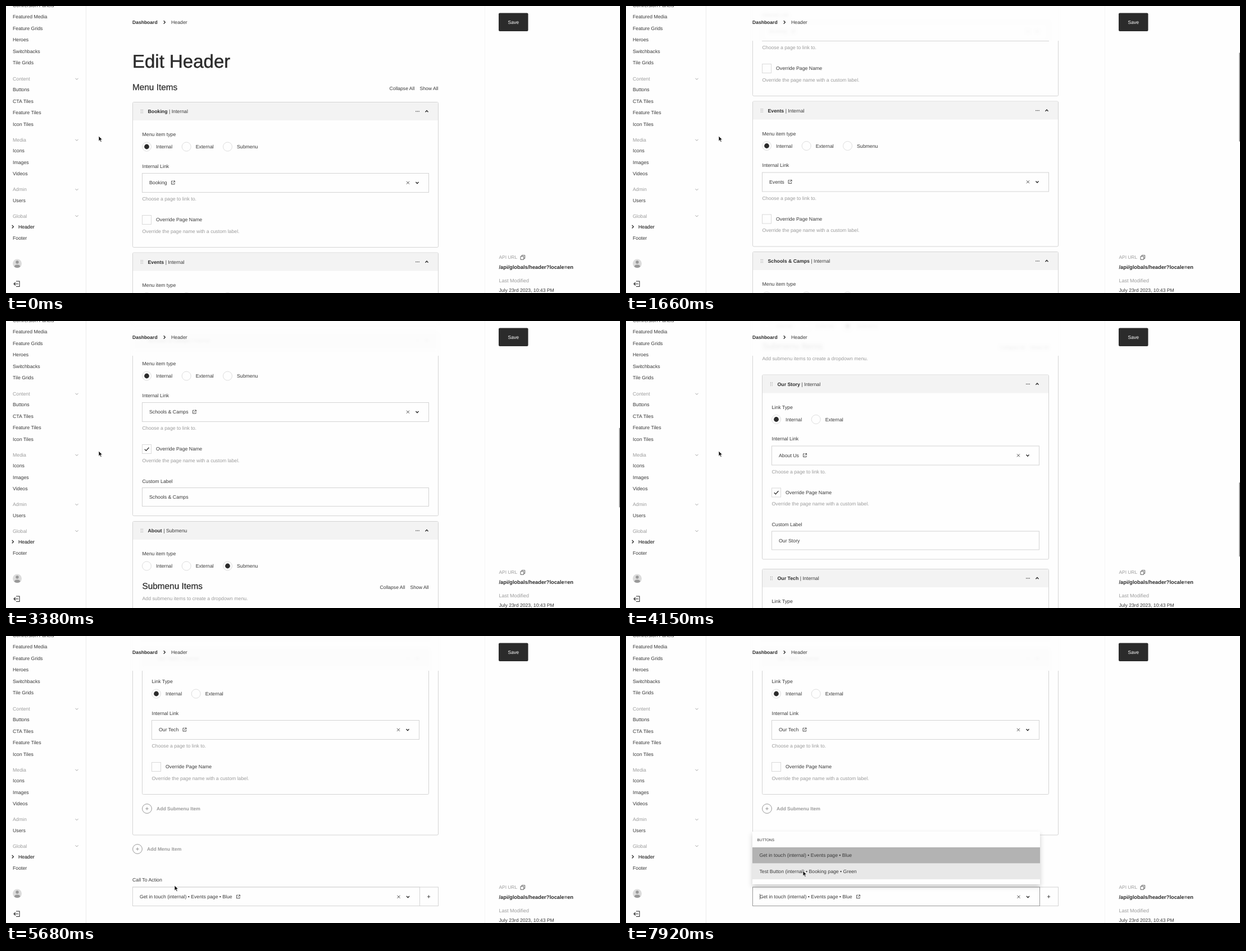
An HTML page that plays this animation: 1093x512 px, repeating every 8000 ms.

```html
<!DOCTYPE html>
<html lang="en">
<head>
<meta charset="utf-8">
<title>Edit Header</title>
<style>
  html, body { margin: 0; width: 100%; height: 100%; overflow: hidden; background: #fefefe; }
  svg { display: block; width: 1093px; height: 512px; }
  text { font-family: "Liberation Sans", Arial, sans-serif; text-rendering: geometricPrecision; white-space: pre; }
</style>
</head>
<body>
<svg id="stage" viewBox="0 0 1093 512"></svg>
<script>
const INK = '#383838', DARK = '#2b2b2b', MUTED = '#9b9b9b', LINE = '#d4d4d4';
const LOOP = 8000, MAX_SCROLL = 1537;

// Drawing helpers; y is the middle of the capitals.
const text = (x, y, str, { size = 8.75, fill = INK, bold = false, extra = '' } = {}) =>
  `<text x="${x}" y="${y + size * 0.355}" font-size="${size}" fill="${fill}"${bold ? ' font-weight="700"' : ''} ${extra}>${str}</text>`;
const hint = (x, y, str) => text(x, y, str, { fill: MUTED, size: 8.72 });
const box = (x, y, r, b, fill = '#fefefe', stroke = LINE, extra = '') =>
  `<rect x="${x}" y="${y}" width="${r - x}" height="${b - y}" fill="${fill}" stroke="${stroke}" ${extra}/>`;
const path = (d, stroke = DARK, width = 1, extra = '') =>
  `<path d="${d}" fill="none" stroke="${stroke}" stroke-width="${width}" ${extra}/>`;
const dot = (x, y, r, fill = DARK) => `<circle cx="${x}" cy="${y}" r="${r}" fill="${fill}"/>`;
const chevron = (x, y, dir = 1, color = DARK, width = 1.4) =>
  path(`M${x - 2.5} ${y - 1.2 * dir}L${x} ${y + 1.4 * dir}L${x + 2.5} ${y - 1.2 * dir}`, color, width);
const chevronRight = (x, y) => path(`M${x - 1.3} ${y - 2.8}l2.7 2.8l-2.7 2.8`, DARK, 1.3);
const cross = (x, y) => path(`M${x - 2.5} ${y - 2.5}l5 5m0 -5l-5 5`, INK, 0.9);
const plus = (x, y, color) => path(`M${x - 2.7} ${y}h5.4m-2.7 -2.7v5.4`, color, 0.9);
const linkIcon = (x, y) =>
  path(`M${x - 0.5} ${y - 2.7}h-2.5v5.7h5.6v-2.3M${x - 1} ${y + 1}l4 -4m-2.6 0h2.6v2.6`, INK, 0.85);
const heading = (x, y, str) =>
  text(x, y, str, { size: 15.35, fill: DARK, extra: `stroke="${DARK}" stroke-width=".25"` });
const toggles = (right, y) =>
  text(right - 87.5, y, 'Collapse All', { size: 8.6 }) + text(right - 33.5, y, 'Show All', { size: 8.6 });

function radios(x, y, names, chosen) {
  const offsets = [0, 70.7, 144];
  return names.map((name, i) => {
    const cx = x + offsets[i];
    return `<circle cx="${cx}" cy="${y}" r="8" fill="#fefefe" stroke="#dedede"/>` +
      (i === chosen ? dot(cx, y, 4.4) : '') + text(cx + 16.5, y, name);
  }).join('');
}

function blockFrame(x, y, right, bottom, title, kind) {
  let out = box(x + 0.5, y + 0.5, right - 0.5, bottom - 0.5, '#fefefe', LINE, 'rx="2"');
  out += `<rect x="${x + 1}" y="${y + 1}" width="${right - x - 2}" height="32" fill="#f3f3f3"/>`;
  const my = y + 17;
  for (let i = 0; i < 6; i++) out += dot(x + 15.5 + (i % 2) * 2.7, my - 2.6 + (i >> 1) * 2.6, 0.6, '#888');
  out += text(x + 27.5, my, `<tspan font-weight="700" fill="${DARK}">${title}</tspan> | ${kind}`);
  for (let i = -1; i < 2; i++) out += dot(right - 37.5 + i * 2.6, my, 0.75);
  return out + chevron(right - 21, my, -1);
}

// A link entry; a custom label makes it 70 px taller.
function linkBlock(x, y, right, { title, label, types, page, icon, custom }) {
  const left = x + 17.5, edge = right - 17.5;
  let out = blockFrame(x, y, right, y + (custom ? 330 : 260), title, 'Internal');
  out += text(left, y + 58, label) + radios(x + 25.5, y + 80, types, 0);
  out += text(left, y + 114.5, 'Internal Link');
  out += box(left, y + 127.5, edge, y + 161.5);
  out += text(x + 30, y + 144, page) + linkIcon(icon, y + 144);
  out += cross(right - 54.5, y + 144.3) + chevron(right - 38, y + 144.3);
  out += hint(left, y + 173, 'Choose a page to link to.');
  out += box(left, y + 202.5, left + 16, y + 218.5, '#fefefe', '#dadada');
  if (custom) out += path(`M${x + 21.8} ${y + 210.7}l2.6 2.7l5 -5.6`, DARK, 1.3);
  out += text(x + 42, y + 210, 'Override Page Name');
  out += hint(left, y + 230.5, 'Override the page name with a custom label.');
  if (custom) {
    out += text(left, y + 267.5, 'Custom Label');
    out += box(left, y + 279.5, edge, y + 312.5) + text(x + 30, y + 296, custom);
  }
  return out;
}

const addButton = (x, y, str) =>
  `<circle cx="${x}" cy="${y}" r="8.4" fill="none" stroke="#999"/>` + plus(x, y, '#888') +
  text(x + 17, y, str, { size: 8.55, bold: true, fill: MUTED });

function documentBody() {
  const menu = { label: 'Menu item type', types: ['Internal', 'External', 'Submenu'] };
  const sub = { label: 'Link Type', types: ['Internal', 'External'] };
  return text(225, 98, 'Edit Header', { size: 33, fill: DARK, extra: `stroke="${DARK}" stroke-width=".5"` }) +
    heading(225, 145, 'Menu Items') + toggles(770, 146.5) +
    linkBlock(225, 171, 770, { ...menu, title: 'Booking', page: 'Booking', icon: 297.5 }) +
    linkBlock(225, 439.5, 770, { ...menu, title: 'Events', page: 'Events', icon: 292 }) +
    linkBlock(225, 708, 770, { ...menu, title: 'Schools &amp; Camps', page: 'Schools &amp; Camps', icon: 335.5, custom: 'Schools &amp; Camps' }) +
    blockFrame(225, 1047, 770, 1892.5, 'About', 'Submenu') +
    text(242.5, 1105, menu.label) + radios(250.5, 1127, menu.types, 2) +
    heading(242.5, 1163, 'Submenu Items') + toggles(753, 1164.5) +
    hint(242.5, 1184.5, 'Add submenu items to create a dropdown menu.') +
    linkBlock(242, 1213.5, 753, { ...sub, title: 'Our Story', page: 'About Us', icon: 318.5, custom: 'Our Story' }) +
    linkBlock(242, 1560, 753, { ...sub, title: 'Our Tech', page: 'Our Tech', icon: 318 }) +
    addButton(251, 1845, 'Add Submenu Item') + addButton(234, 1917, 'Add Menu Item') +
    text(225, 1972, 'Call To Action') +
    box(225.5, 1985, 769.5, 2018.5) + plus(752.5, 2002, INK) +
    box(225.5, 1985, 736.5, 2018.5, '#fefefe', LINE, 'id="field"') +
    text(238, 2002, 'Get in touch (internal) • Events page • Blue', { size: 8.69 }) +
    linkIcon(413.5, 2002) + cross(699, 2002.3) + chevron(715.5, 2002.3) +
    path('M238.5 1997v10', '#555', 0.8, 'id="caret"');
}

function sidebar() {
  const groups = [
    ['', -20.5, ['Conversion Panels', 'Featured Media', 'Feature Grids', 'Heroes', 'Switchbacks', 'Tile Grids']],
    ['Content', 130, ['Buttons', 'CTA Tiles', 'Feature Tiles', 'Icon Tiles']],
    ['Media', 239, ['Icons', 'Images', 'Videos']],
    ['Admin', 327.3, ['Users']],
    ['Global', 374.5, ['Header', 'Footer']]
  ];
  let out = '';
  for (const [name, y, rows] of groups) {
    if (name) out += text(12, y, name, { fill: MUTED }) + chevron(126, y, 1, MUTED, 0.9);
    rows.forEach((row, i) => {
      const active = row === 'Header';
      out += text(active ? 22 : 12, y + 19.3 + i * 20.5, row,
        active ? { extra: `stroke="${INK}" stroke-width=".2"` } : {});
    });
  }
  return out + chevronRight(12, 393.7) +
    dot(20, 459.5, 8, '#dcdcdc') + dot(20, 457, 2.7, '#999') +
    '<path d="M14.5 464.8a5.7 4.6 0 0 1 11 0a8 8 0 0 1 -11 0z" fill="#999"/>' +
    path('M18 491h6v9.5h-6M22 495.7h-8m2.8 -2.8l-2.8 2.8l2.8 2.8', DARK, 1.1);
}

const aside = () =>
  '<rect x="877" y="12.5" width="52.5" height="32.5" rx="2" fill="#2b2b2b"/>' +
  text(903.3, 29, 'Save', { size: 8.6, fill: '#fff', extra: 'text-anchor="middle"' }) +
  text(877.5, 448.5, 'API URL', { size: 8.4, fill: MUTED }) +
  path('M918 446.5v-1.8h5.7v5.7h-1.9M916 446.7h5.7v5.7h-5.7z', '#555', 0.9) +
  text(877.5, 465.5, '/api/globals/header?locale=en', { size: 9.3, bold: true, fill: DARK }) +
  text(877.5, 490, 'Last Modified', { size: 9, fill: MUTED }) +
  text(877.5, 506.5, 'July 23rd 2023, 10:43 PM', { size: 8.65 });

const stage = document.getElementById('stage');
stage.innerHTML = `
  <defs>
    <clipPath id="below"><rect id="belowRect" x="143" y="62" width="709" height="470"/></clipPath>
    <clipPath id="above"><rect id="aboveRect" x="143" y="0" width="709" height="62"/></clipPath>
    <filter id="soft" filterUnits="userSpaceOnUse" x="143" y="-10" width="709" height="90"><feGaussianBlur stdDeviation="2.5"/></filter>
    <filter id="lift" filterUnits="userSpaceOnUse" x="200" y="330" width="560" height="150"><feDropShadow dx="0" dy="4" stdDeviation="4" flood-opacity=".2"/></filter>
  </defs>
  <rect width="1093" height="512" fill="#fefefe"/>
  ${path('M142.5 0v512', '#ebebeb')}${path('M852.5 0v512', '#f5f5f5')}
  <g clip-path="url(#below)"><g id="body">${documentBody()}</g></g>
  <g clip-path="url(#above)" opacity=".1"><g filter="url(#soft)"><use href="#body"/></g></g>
  <g id="pinned">${sidebar()}
    ${text(225, 29, 'Dashboard', { size: 8.55, bold: true, fill: DARK })}${chevronRight(282, 29)}${text(294, 29, 'Header')}
  </g>
  ${aside()}
  <rect id="thumb" x="1091.5" width="1.5" fill="#858585"/>
  <g id="list">
    <rect id="sheet" x="225" width="512" fill="#fefefe" filter="url(#lift)"/>
    <rect id="second" x="225" y="405.5" width="512" height="28.5" fill="#e8e8e8"/>
    ${text(237.5, 420, 'Test Button (internal) • Booking page • Green', { size: 8.7, extra: 'id="secondText"' })}
    <g id="first">
      ${text(233.5, 15, 'BUTTONS', { size: 6.4, fill: DARK })}
      <rect x="225" y="28" width="512" height="28.5" fill="#b3b3b3"/>
      ${text(237.5, 42, 'Get in touch (internal) • Events page • Blue', { size: 8.69 })}
    </g>
  </g>
  <path id="cursor" d="M0 0v9.2l2.1 -2l1.5 3.4l1.6 -.7l-1.5 -3.3h2.9z" fill="#111" stroke="#fff" stroke-width=".7"/>`;

const el = id => document.getElementById(id);
const set = (id, attrs) => { for (const k in attrs) el(id).setAttribute(k, attrs[k]); };
const show = (id, on) => set(id, { visibility: on ? 'visible' : 'hidden' });

// Motion is held between steps: [time, ...values].
const scrollSteps = [
  [0, 0], [750, 8], [890, 32], [1040, 61.7], [1190, 150], [1350, 215], [1500, 255], [1660, 270],
  [1950, 300], [2100, 360], [2280, 397], [2580, 440], [2750, 545], [2920, 615], [3090, 640],
  [3380, 690], [3530, 830], [3680, 855], [3970, 960], [4150, 1118], [4300, 1280], [4440, 1400],
  [4590, 1490], [4740, 1532], [4880, 1546], [5030, 1544], [5210, 1541], [5360, 1539], [5520, 1538], [5680, 1537]
];
const cursorSteps = [
  [0, 165, 232], [5360, 200, 320], [5520, 262, 400], [5680, 300, 445], [5980, 309, 458],
  [6130, 314, 465], [6280, 314.5, 465], [6580, 315, 466], [7320, 315, 462], [7470, 315, 454],
  [7620, 315, 440], [7770, 315, 426], [7920, 315, 419]
];
const at = (steps, t) => steps.reduce((cur, s) => (s[0] <= t ? s : cur));

// The page grows as its blocks get rendered while scrolling.
const heights = [[0, 1440], [62, 1489], [397, 1759], [1118, 1986], [MAX_SCROLL, 2049]];
function pageHeight(scroll) {
  const i = Math.max(1, heights.findIndex(h => h[0] >= scroll));
  const [a, b] = [heights[i - 1], heights[i]];
  return a[1] + (b[1] - a[1]) * (scroll - a[0]) / (b[0] - a[0]);
}

function draw(t) {
  const scroll = at(scrollSteps, t)[1];
  const over = Math.max(0, scroll - MAX_SCROLL), inside = scroll - over;
  set('body', { transform: `translate(0 ${-scroll})` });
  set('pinned', { transform: `translate(0 ${-over})` });
  set('belowRect', { y: 62 - over });
  set('aboveRect', { height: 62 - over });

  const ratio = 512 / pageHeight(inside);
  const top = inside * ratio + over * 1.57;
  set('thumb', { y: top, height: Math.min(512 * ratio, 512 - top) });
  show('thumb', t >= 750 && t < 5680);

  const hovered = t >= 5980;
  set('field', { stroke: hovered ? '#999' : LINE });
  show('caret', t >= 6280);

  const open = t >= 6880, both = t >= 7020;
  const listTop = both ? 349 : 378;
  set('list', { display: open ? 'inline' : 'none' });
  set('sheet', { y: listTop, height: 443 - listTop });
  set('first', { transform: `translate(0 ${listTop})` });
  show('secondText', both);
  show('second', t >= 7770);

  const [, x, y] = at(cursorSteps, t);
  set('cursor', { transform: `translate(${x} ${y})` });
}

const start = performance.now();
function tick() {
  draw((performance.now() - start) % LOOP);
  requestAnimationFrame(tick);
}
tick();
</script>
</body>
</html>
```
